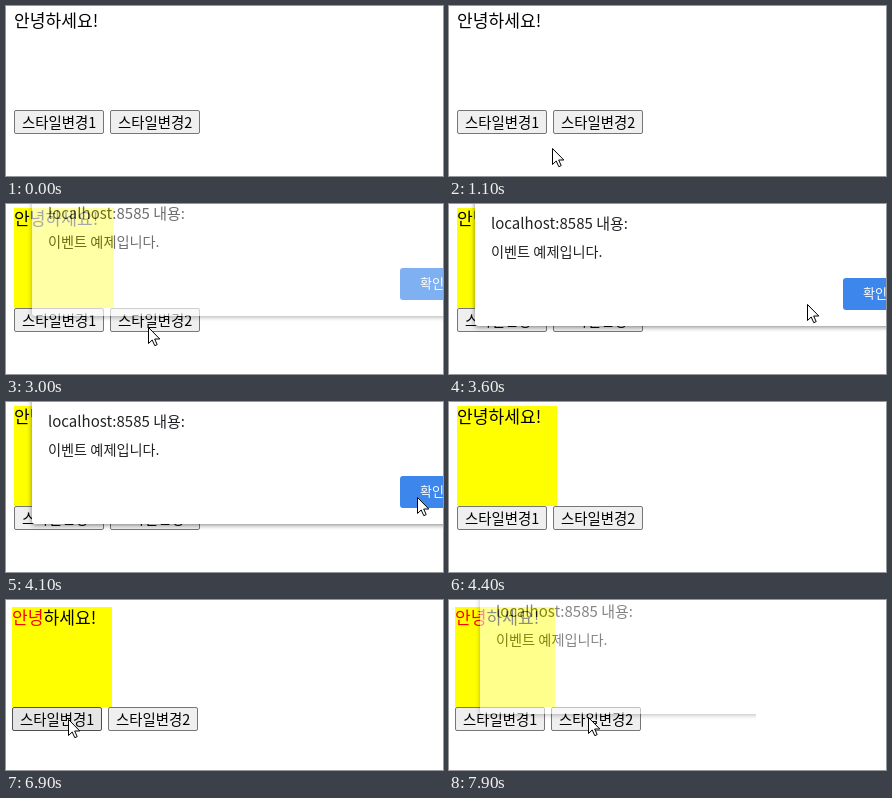
Recreate the animation shown at these times as an HTML page with a canvas. Size 437x170 px, loop 8 s.

```html
<!DOCTYPE html>
<html lang="ko">
<head>
<meta charset="utf-8">
<title>스타일 변경 예제</title>
<style>
html, body { margin: 0; width: 100%; height: 100%; overflow: hidden; background: #fff; }
canvas { display: block; }
</style>
</head>
<body>
<canvas id="stage" width="437" height="170"></canvas>
<script>
const W = 437, H = 170, LOOP = 8000, STEP = 100;
const FONT = '"Noto Sans CJK KR", "Noto Sans CJK JP", "Noto Sans CJK", sans-serif';
const ctx = document.getElementById('stage').getContext('2d');

const within = (t, a, b) => t >= a && t < b;

// Places where the pointer rests
const ENTRY = [427, 77], STYLE = [73, 118], EVENT = [142, 123], OK = [411, 95];
const STYLE2 = [62, 119], EVENT2 = [139, 117];

// Each move follows a cubic curve and slows down by its own power
const MOVES = [
  { at: 600, time: 800, ease: 1.8, curve: [ENTRY, [330, 150], [100, 180], STYLE] },
  { at: 2100, time: 700, ease: 1.2, curve: [STYLE, [80, 142], [130, 138], EVENT] },
  { at: 3200, time: 900, ease: 2.5, curve: [EVENT, [240, 112], [340, 102], OK] },
  { at: 6300, time: 300, ease: 1, curve: [[66, 136], [64, 130], [62, 125], STYLE2] },
  { at: 7200, time: 700, ease: 1.2, curve: [STYLE2, [62, 138], [124, 132], EVENT2] }
];

function bezier([a, b, c, d], u) {
  const v = 1 - u;
  return [0, 1].map(k => Math.round(
    v * v * v * a[k] + 3 * v * v * u * b[k] + 3 * v * u * u * c[k] + u * u * u * d[k]));
}

function pointerAt(t) {
  if (!within(t, 600, 4400) && t < 6300) return null;
  const { at, time, ease, curve } = MOVES.filter(m => m.at <= t).pop();
  const s = Math.min((t - at) / time, 1);
  return bezier(curve, 1 - (1 - s) ** ease);
}

function label(c, text, x, y, size, color) {
  c.font = `300 ${size}px ${FONT}`;
  c.fillStyle = color;
  c.fillText(text, x, y);
  return x + c.measureText(text).width;
}

function box(c, x, y, w, h, r, fill) {
  c.beginPath();
  c.roundRect(x, y, w, h, r);
  c.fillStyle = fill;
  c.fill();
}

function drawButton(text, x, y, pointer, pressed) {
  const hover = pointer && within(pointer[0], x, x + 90) && within(pointer[1], y, y + 24);
  const [fill, line] = !hover ? ['#efefef', '#767676']
    : pressed ? ['#f5f5f5', '#8d8d8d'] : ['#e5e5e5', '#4f4f4f'];
  box(ctx, x + 0.5, y + 0.5, 89, 23, 1.5, fill);
  ctx.strokeStyle = line;
  ctx.lineWidth = 1;
  ctx.stroke();
  label(ctx, text, x + 8, y + 18, 14.4, '#000');
}

function drawPage(t, pointer) {
  const second = t >= 5400;
  const x = second ? 6 : 8, y = second ? 7 : 4;
  const styled = within(t, 1700, 5400) || t >= 6900;
  const pressed = within(t, 1600, 1700) || within(t, 6800, 6900);
  if (styled) {
    ctx.fillStyle = '#ff0';
    ctx.fillRect(x, y, 100, 100);
  }
  const next = label(ctx, '안녕', x, y + 17, 17.1, second && styled ? '#f00' : '#000');
  label(ctx, '하세요!', next, y + 17, 17.1, '#000');
  drawButton('스타일변경1', x, y + 100, pointer, pressed);
  drawButton('스타일변경2', x + 96, y + 100, pointer, false);
}

// The dialog is painted once, so that it can fade as a whole
function makeDialog() {
  const layer = document.createElement('canvas');
  layer.width = W + 40;
  layer.height = H + 40;
  const c = layer.getContext('2d');
  c.translate(0, 20);
  c.shadowColor = 'rgba(0,0,0,.5)';
  c.shadowBlur = 5;
  c.shadowOffsetY = 1;
  box(c, 26, -60, 520, 182, 3, '#fff');
  c.shadowColor = 'transparent';
  label(c, 'localhost:8585 내용:', 42, 25, 15, '#202124');
  label(c, '이벤트 예제입니다.', 42, 53, 14.2, '#202124');
  box(c, 394, 74, 66, 32, 3, '#3c86ec');
  label(c, '확인', 414, 94, 13, '#fff');
  return layer;
}

const dialog = makeDialog();

function showDialog(alpha, dx, dy, right = W) {
  ctx.save();
  ctx.beginPath();
  ctx.rect(0, 0, right, H);
  ctx.clip();
  ctx.globalAlpha = alpha;
  ctx.drawImage(dialog, dx, dy - 20);
  ctx.restore();
}

function drawDialog(t) {
  if (within(t, 3100, 4300)) showDialog(1, 0, 0);
  else if (within(t, 3000, 4400)) showDialog(0.65, 0, -10);
  else if (t >= 7900) showDialog(0.55, 5, -8, 307);
}

const ARROW = new Path2D('M.5 .5V16.5L4.2 13L6.8 18.7L9.2 17.6L6.7 12H11.8Z');

function drawPointer([x, y]) {
  ctx.save();
  ctx.translate(x, y);
  ctx.fillStyle = '#fff';
  ctx.fill(ARROW);
  ctx.strokeStyle = '#000';
  ctx.lineWidth = 1;
  ctx.stroke(ARROW);
  ctx.restore();
}

function frame(now) {
  const t = Math.floor((now % LOOP) / STEP) * STEP;
  const pointer = pointerAt(t);
  const blocked = within(t, 3000, 4400) || t >= 7900;
  ctx.fillStyle = '#fff';
  ctx.fillRect(0, 0, W, H);
  drawPage(t, blocked ? null : pointer);
  drawDialog(t);
  if (pointer) drawPointer(pointer);
  requestAnimationFrame(frame);
}
requestAnimationFrame(frame);
</script>
</body>
</html>
```
